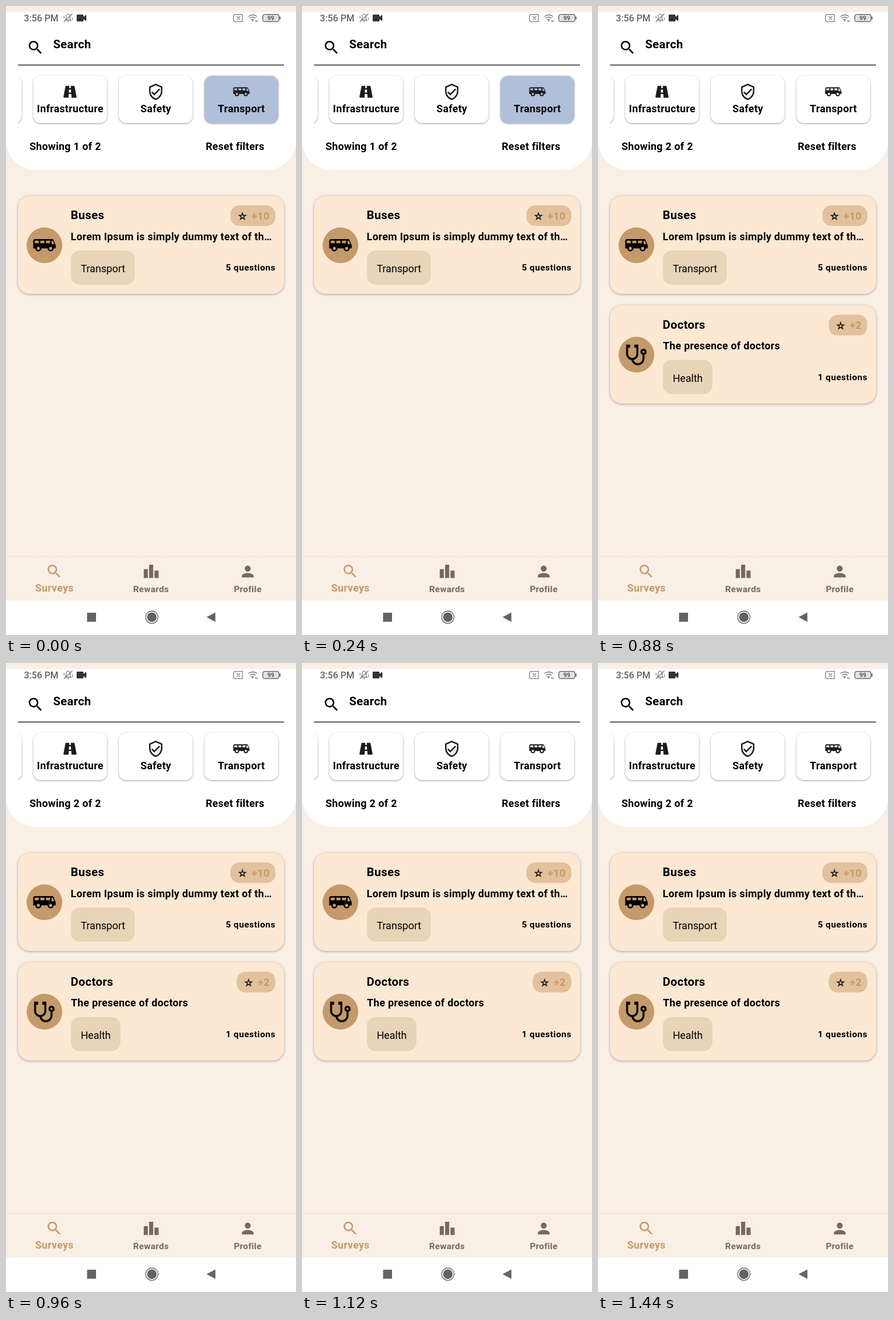
These frames come from a looping animation (509x1101 px, 1.84 s). An HTML page:

```html
<!DOCTYPE html>
<html lang="en">
<head>
<meta charset="utf-8">
<title>Survey filter</title>
<style>
  html, body { margin: 0; width: 100%; height: 100%; overflow: hidden; background: #faefe5; }
  svg { display: block; width: 509px; height: 1101px; }
  text { font: 700 18.13px Roboto, sans-serif; letter-spacing: .324px; }
  .title { font-size: 20.7px; }
  .small { font-size: 15.54px; }
  .note { font-size: 15.54px; letter-spacing: .52px; }
  .chip { font-weight: 400; letter-spacing: 0; }
  .status { font-weight: 500; font-size: 16.2px; letter-spacing: 0; }
  .battery { font-size: 10.5px; }
  .mid { text-anchor: middle; }
  .end { text-anchor: end; }
  .tile { fill: #fff; filter: drop-shadow(0 1px 1.8px #0006); }
  .card { fill: #fde8d3; filter: drop-shadow(0 1.8px 2px #0005); }
  .on { fill: #b0c0da; }
  .line { fill: none; stroke: #777; stroke-width: 1.3; }
  .tan { fill: #c49a6c; }
  .gray { fill: #756864; }
</style>
</head>
<body>
<svg viewBox="0 0 509 1101">
  <defs>
    <path id="search" transform="scale(1.3)" d="M15.5 14h-.79l-.28-.27A6.47 6.47 0 0 0 16 9.5 6.5 6.5 0 1 0 9.5 16c1.61 0 3.09-.59 4.23-1.57l.27.28v.79l5 4.99L20.49 19l-4.99-5zm-6 0a4.5 4.5 0 1 1 0-9 4.5 4.5 0 0 1 0 9z"/>
    <path id="road" transform="scale(1.3)" d="M18.1 4.8C18 4.3 17.6 4 17.1 4H13l.2 3h-2.4L11 4H6.8c-.5 0-.9.4-1 .8l-2.7 14c-.1.6.4 1.2 1 1.2H10l.3-5h3.4l.3 5h5.8c.6 0 1.1-.6 1-1.2zM10.4 13l.2-4h2.6l.2 4z"/>
    <path id="shield" transform="scale(1.3)" d="M12 1 3 5v6c0 5.55 3.84 10.74 9 12 5.16-1.26 9-6.45 9-12V5zm7 10c0 4.52-2.98 8.69-7 9.93-4.02-1.24-7-5.41-7-9.93V6.3l7-3.11 7 3.11zm-11.59.59L6 13l4 4 8-8-1.41-1.42L10 14.17z"/>
    <path id="bars" transform="scale(1.3)" d="M7.5 21H2V9h5.5zM14.75 3h-5.5v18h5.5zM22 11h-5.5v10H22z"/>
    <path id="person" transform="scale(1.3)" d="M12 12a4 4 0 1 0 0-8 4 4 0 0 0 0 8zm0 2c-2.67 0-8 1.34-8 4v2h16v-2c0-2.66-5.33-4-8-4z"/>
    <path id="star" fill="none" stroke="#111" stroke-width="1.5" d="M0-6 1.35-1.85H5.7L2.18.71 3.53 4.85 0 2.29-3.53 4.85-2.18.71-5.7-1.85h4.35z"/>
    <path id="bus" fill-rule="evenodd" d="M3 6a2 2 0 0 0-2 2v7h2a3 3 0 0 0 6 0h6a3 3 0 0 0 6 0h2v-3l-2.2-5.2Q20.400 6 19.500 6zM2.500 7.500h4V10h-4zM8 7.500h4V10H8zm5.500 0h4V10h-4zm5.500 0h1.100L21.600 11H19zM6 13.500a1.500 1.500 0 1 1 0 3 1.500 1.500 0 0 1 0-3zm12 0a1.500 1.500 0 1 1 0 3 1.500 1.500 0 0 1 0-3z"/>
    <path id="stethoscope" fill="#0c0c0c" d="M19 8a1 1 0 1 1 0 2 1 1 0 0 1 0-2zM2 2v9c0 2.960 2.190 5.500 5.140 5.910A6.500 6.500 0 0 0 20 15.500v-3.690A3 3 0 1 0 16 9c0 1.290.84 2.400 2 2.810v3.600a4.500 4.500 0 0 1-8.780 1.490C12 16.300 14 13.800 14 11V2h-4v3h2v6a4 4 0 0 1-8 0V5h2V2z"/>
    <clipPath id="row"><path d="M21 110h480v110H21z"/></clipPath>
    <linearGradient id="edge" x2="0" y2="1"><stop stop-color="#faefe5"/><stop offset="1" stop-color="#f1e4d9"/></linearGradient>
  </defs>

  <path fill="#faefe5" d="M0 0h509v1101H0z"/>
  <path fill="#fff" d="M0 10.5h509V235a52 52 0 0 1-52 52H52a52 52 0 0 1-52-52z"/>

  <!-- Status bar -->
  <text class="status" x="31.5" y="27" fill="#626262">3:56 PM</text>
  <path class="line" d="M104 25h10l-1.500-2.500V19q0-4-3.500-5-3.500 1-3.500 5v3.500zm3.500 2.300h3M101.500 28 116.500 13.500M102 17.500v4m14.500-1v4"/>
  <path fill="#333" d="M125.5 15h9q1.5 0 1.5 1.5V19l5-3.5v11L136 23v2.5q0 1.5-1.5 1.5h-9q-1.5 0-1.5-1.5v-9q0-1.5 1.5-1.5z"/>
  <path class="line" d="M403 14.7h12v12.6h-12q-3.5 0-3.5-3v-6.6q0-3 3.5-3zm2 3.3 6 6m0-6-6 6"/>
  <path class="line" d="M425.5 18.5q7.500-6 15 0M428 21.500q5-4 10 0M430.500 24.500q2.500-2 5 0"/>
  <path fill="#777" d="M431.5 25h3l-1.5 2.5zM438 25h1.3v3H438zm2.3 0h1.3v3h-1.3z"/>
  <rect x="450.6" y="14.6" width="28.6" height="12.8" rx="4" fill="#e2e2e2" stroke="#555" stroke-width="1.3"/>
  <path fill="#555" d="M480.3 18.5h1.5v5h-1.5z"/>
  <text class="status battery mid" x="464.8" y="25" fill="#444">99</text>

  <!-- Search and filters -->
  <use href="#search" x="36" y="57"/>
  <text class="title" x="82.8" y="74">Search</text>
  <path d="M21 102.7h467v1.3H21z"/>
  <g clip-path="url(#row)">
    <rect class="tile" x="-102" y="122" width="129.5" height="83" rx="13"/>
    <rect class="tile" x="48" y="122" width="129.5" height="83" rx="13"/>
    <rect class="tile" x="198" y="122" width="129.5" height="83" rx="13"/>
    <rect class="tile" x="348.3" y="122" width="129.5" height="83" rx="13" id="filter"/>
  </g>
  <g fill="#1d1d1d">
    <use href="#road" x="96.8" y="134.5"/>
    <use href="#shield" x="247.2" y="134.6"/>
    <use href="#bus" transform="translate(397.5 134.4) scale(1.3)"/>
  </g>
  <text class="mid" x="112.7" y="185.5">Infrastructure</text>
  <text class="mid" x="263" y="185.5">Safety</text>
  <text class="mid" x="413.2" y="185.5">Transport</text>
  <text x="41.3" y="252" id="count"></text>
  <text x="350.4" y="252">Reset filters</text>

  <!-- Surveys -->
  <g>
    <rect class="card" x="21" y="332.3" width="467.3" height="171.8" rx="21"/>
    <circle class="tan" cx="67.5" cy="418.8" r="31.3"/>
    <use href="#bus" transform="translate(45.9 397.2) scale(1.8)"/>
    <text class="title" x="113.5" y="373.4">Buses</text>
    <rect x="394" y="349" width="78.7" height="36" rx="15" fill="#e2c19c"/>
    <use href="#star" x="415" y="368.3"/>
    <text class="tan end" x="462.7" y="373.5">+10</text>
    <text x="113.5" y="409.5">Lorem Ipsum is simply dummy text of th…</text>
    <rect x="113.8" y="428" width="112.2" height="59.7" rx="15.5" fill="#e8d4b7"/>
    <text class="chip mid" x="170.2" y="466">Transport</text>
    <text class="note end" x="473" y="463">5 questions</text>
  </g>
  <g id="doctors">
    <rect class="card" x="21" y="524" width="467.3" height="171.8" rx="21"/>
    <circle class="tan" cx="67.5" cy="610.4" r="31.3"/>
    <use href="#stethoscope" transform="translate(45.7 589.2) scale(1.8)"/>
    <text class="title" x="113.5" y="565">Doctors</text>
    <rect x="405" y="540.6" width="67.7" height="36" rx="15" fill="#e2c19c"/>
    <use href="#star" x="425.8" y="560"/>
    <text class="tan end" x="462.7" y="565">+2</text>
    <text x="114" y="601">The presence of doctors</text>
    <rect x="113.8" y="619.5" width="87" height="59.7" rx="15.5" fill="#e8d4b7"/>
    <text class="chip mid" x="157.5" y="657.5">Health</text>
    <text class="note end" x="473" y="654.6">1 questions</text>
  </g>

  <!-- Navigation -->
  <path fill="url(#edge)" d="M0 961h509v4H0z"/>
  <g class="tan">
    <use href="#search" x="69" y="974"/>
    <text class="mid" x="85" y="1025">Surveys</text>
  </g>
  <g class="gray">
    <use href="#bars" x="239.2" y="974"/>
    <use href="#person" x="408.7" y="974.3"/>
    <text class="small mid" x="254.5" y="1026">Rewards</text>
    <text class="small mid" x="424.3" y="1026">Profile</text>
  </g>
  <path fill="#fff" d="M0 1040.5h509V1101H0z"/>
  <g fill="#636363">
    <path d="M142.3 1062h15.7v15.7h-15.7zM352 1069.8l15.5-8.3v16.6z"/>
    <circle cx="256" cy="1069.8" r="8.4"/>
    <circle cx="256" cy="1069.8" r="10.8" fill="none" stroke="#636363" stroke-width="1.3"/>
  </g>
</svg>
<script>
  const LOOP = 1840, CLEARED = 880;
  const byId = id => document.getElementById(id);
  const filter = byId('filter'), count = byId('count'), doctors = byId('doctors');
  const start = performance.now();

  function draw(now) {
    const cleared = Math.max(0, now - start) % LOOP >= CLEARED;
    filter.classList.toggle('on', !cleared);
    doctors.style.display = cleared ? '' : 'none';
    count.textContent = `Showing ${cleared ? 2 : 1} of 2`;
    requestAnimationFrame(draw);
  }
  draw(start);
</script>
</body>
</html>
```
